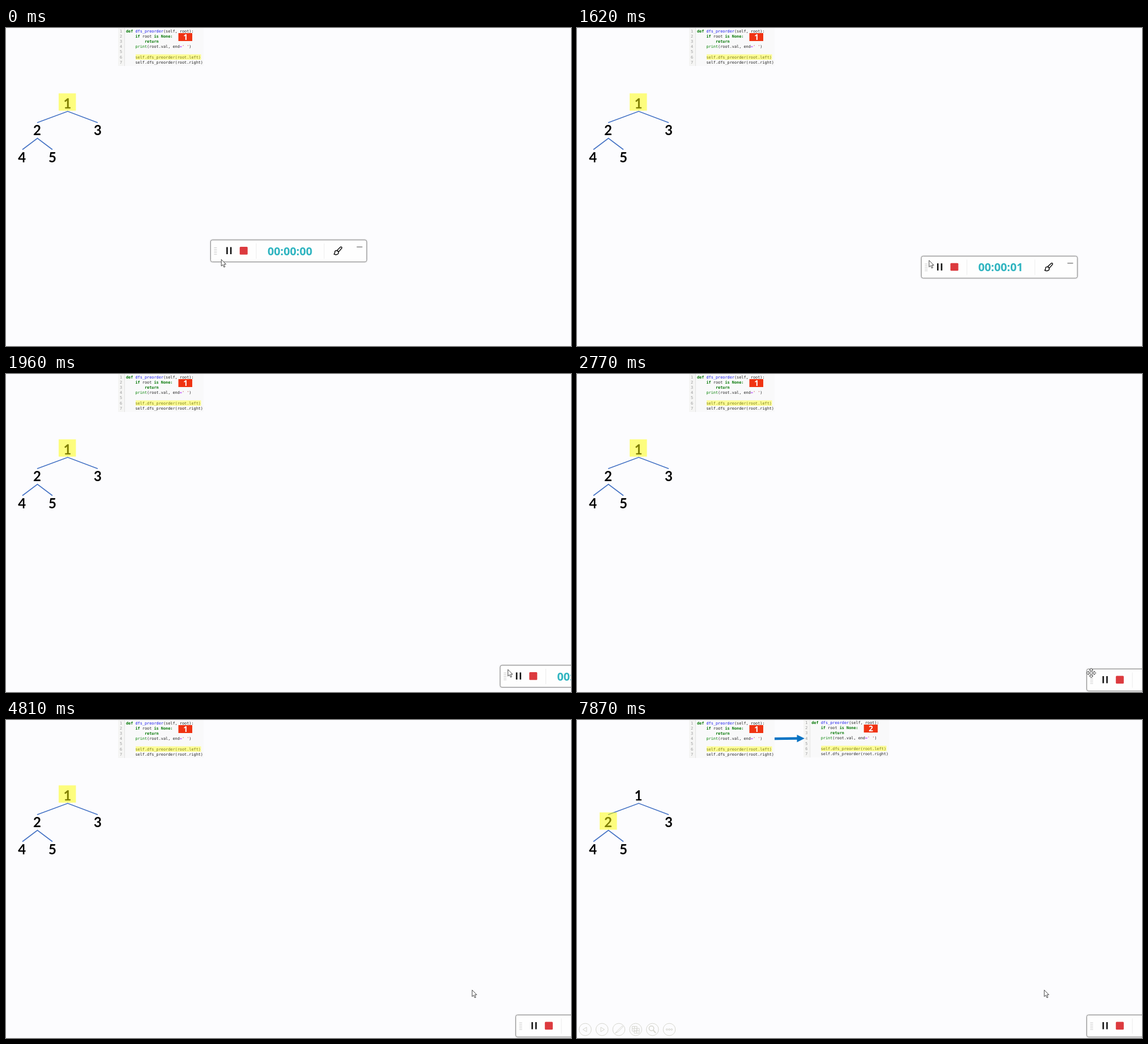
Write an HTML page that moves like this. It is 998 px wide and 561 px high and loops after 8000 ms.

```html
<!DOCTYPE html>
<html lang="en">
<head>
<meta charset="utf-8">
<title>Preorder traversal</title>
<style>
  html, body { margin: 0; width: 100%; height: 100%; overflow: hidden; background: #fcfcfe; }
  svg { display: block; width: 998px; height: 561px; }
  .code { font: 6.85px "DejaVu Sans Mono", monospace; fill: #222; }
  .kw { font-weight: bold; fill: #007500; }
  .fn { fill: #1a1aee; }
  .builtin { fill: #008000; }
  .op { fill: #a2f; }
  .str { fill: #ba2121; }
  .num { fill: #999; }
  .tree { font: bold 24px Lato, sans-serif; text-anchor: middle; }
  .badge { font: bold 13.5px "Open Sans", sans-serif; fill: #fff; text-anchor: middle; }
  .timer { font: bold 19.8px "Open Sans", sans-serif; fill: #2fb4c0; text-anchor: middle; }
  .mark { fill: #ff0; fill-opacity: .5; }
  .nav { fill: none; stroke: #d6d6cf; }
</style>
</head>
<body>
<svg viewBox="0 0 998 561">
  <defs>
    <filter id="shadow" x="-5%" y="-20%" width="110%" height="140%">
      <feDropShadow dx="0" dy="0" stdDeviation="1.3" flood-color="#555" flood-opacity=".5"/>
    </filter>
    <g id="code" class="code">
      <path fill="#f9f9fa" d="M198 0H349V67H198Z"/>
      <path fill="#f5f5f4" d="M198 0H209V67H198Z"/>
      <path stroke="#ddd" stroke-width=".8" d="M209.5 0V67"/>
      <g id="numbers" class="num"></g>
      <text x="212" y="8.2"><tspan class="kw">def</tspan> <tspan class="fn">dfs_preorder</tspan>(self, root):</text>
      <text x="228.5" y="17.3"><tspan class="kw">if</tspan> root <tspan class="kw">is</tspan> <tspan class="kw">None:</tspan></text>
      <text x="245" y="26.3" class="kw">return</text>
      <text x="228.5" y="35.4"><tspan class="builtin">print</tspan>(root.val, end<tspan class="op">=</tspan><tspan class="str">' '</tspan>)</text>
      <text x="228.5" y="53.5">self.dfs_preorder(root.left)</text>
      <text x="228.5" y="62.6">self.dfs_preorder(root.right)</text>
      <path class="mark" style="fill-opacity:.4" d="M229 46.5H344.5V56H229Z"/>
      <path fill="#f03312" d="M304.5 9H329V23H304.5Z"/>
    </g>
  </defs>

  <use href="#code"/>
  <text class="badge" x="317" y="21">1</text>
  <g id="call">
    <use href="#code" x="202.2" y="-.9"/>
    <text class="badge" x="519" y="20.2">2</text>
    <path fill="#0a74c4" d="M349 30.7L388.5 30.3V26L402 32.6L388.5 39.2V34.8L349 35.2Z"/>
  </g>

  <path fill="none" stroke="#4472c4" stroke-width="1.6" d="M55 167L109 147L162 167M29 214.5L55.5 194.5L82 214.5"/>
  <g class="tree">
    <text x="108.5" y="142">1</text>
    <text x="55" y="189.3">2</text>
    <text x="162" y="189.3">3</text>
    <text x="28.3" y="236.8">4</text>
    <text x="82" y="236.8">5</text>
  </g>
  <rect id="mark" class="mark" width="30.5" height="30.5"/>

  <g id="nav" class="nav">
    <g id="rings"></g>
    <path d="M17 542V550L10.5 546ZM42 542V550L48.5 546Z"/>
    <path d="M80 539.5L71 548.5L67.5 552.5L72.5 550L81.5 541Z"/>
    <path d="M97.5 540.5H106V549H97.5ZM101 544H110V552.5H101ZM97.5 544.7H101M101.5 540.5V544M101 548.2H110M105.5 544V552.5"/>
    <circle cx="131.5" cy="544" r="4.2" stroke-width="1.5"/>
    <path stroke-width="2" d="M134.5 547L139 552"/>
    <g id="dots"></g>
  </g>

  <g id="bar">
    <rect width="275.5" height="38.5" rx="3" fill="#fefefe" stroke="#8c8c8c" filter="url(#shadow)"/>
    <path stroke="#ccc" stroke-width="5" stroke-dasharray="1 2" d="M8.5 13V26"/>
    <path stroke="#111" stroke-width="2.6" d="M29 12.5V25M35.7 12.5V25"/>
    <rect x="51.3" y="12" width="14" height="13.7" rx="1.5" fill="#dc3a3e"/>
    <path stroke="#ececec" d="M80.5 6V33M200.5 6V33"/>
    <text id="timer" class="timer" x="140" y="26.6"></text>
    <path fill="#fff" stroke="#111" stroke-width="1.5" stroke-linejoin="round" d="M223.5 18L229.5 12.3Q232.3 11.6 231.7 14.3L226 21ZM223 18.5Q219 18.5 219.3 22Q219.3 24 217.8 24.8Q222.5 27.3 225.5 24Q227 21 223 18.5Z"/>
    <path stroke="#666" stroke-width="1.2" d="M258 12.3H268"/>
  </g>

  <path id="arrow" fill="#fff" stroke="#333" stroke-width=".9" d="M.3 .3V12L3 9.5L5 14L6.9 13.2L5 8.8H8.6Z"/>
  <path id="move" fill="#fff" stroke="#333" stroke-width=".9" d="M0-8.5L3.2-5H1.2V-1.2H5V-3.2L8.5 0L5 3.2V1.2H1.2V5H3.2L0 8.5L-3.2 5H-1.2V1.2H-5V3.2L-8.5 0L-5-3.2V-1.2H-1.2V-5H-3.2Z"/>
</svg>
<script>
const el = id => document.getElementById(id);
const repeat = (n, make) => Array.from({ length: n }, (_, i) => make(i)).join('');
const place = (node, x, y) => node.setAttribute('transform', `translate(${x} ${y})`);
const show = (node, on) => node.setAttribute('visibility', on ? 'visible' : 'hidden');

el('numbers').innerHTML = repeat(7, i => `<text x="201" y="${8.2 + i * 9.07}">${i + 1}</text>`);
el('rings').innerHTML = repeat(6, i => `<circle cx="${14.5 + i * 29.7}" cy="546" r="10.8"/>`);
el('dots').innerHTML = repeat(3, i => `<circle cx="${158.8 + i * 4.2}" cy="546" r="1.4"/>`);

// Tracks hold [time, x, y].
const barTrack = [[1360, 361.5, 374], [1620, 607.5, 402.3], [1960, 873, 514], [2170, 875, 514], [2380, 900.5, 520.5]];
const grip = [13.3, 7];
const pointerTrack = [
  [90, 380, 408], [890, 416, 384], [940, 416, 384], [1190, 374.8, 381],
  ...barTrack.map(([t, x, y]) => [t, x + grip[0], y + grip[1]]),
  [2770, 913, 527.5], [2980, 872.5, 519], [3150, 872.5, 519], [3490, 829, 470.5],
  [4510, 829, 470.5], [4810, 823, 476], [7750, 823, 476], [7870, 825, 476]
];

function at(track, t) {
  const i = track.findIndex(p => p[0] > t);
  if (i === 0) return track[0].slice(1);
  if (i < 0) return track[track.length - 1].slice(1);
  const [a, b] = [track[i - 1], track[i]];
  const k = (t - a[0]) / (b[0] - a[0]);
  return [a[1] + (b[1] - a[1]) * k, a[2] + (b[2] - a[2]) * k];
}

function draw(now) {
  const t = now % 8000;
  const called = t >= 6300;
  const moving = t >= 2770 && t < 2850;
  const [x, y] = at(pointerTrack, t);
  place(el('bar'), ...at(barTrack, t));
  place(el('arrow'), x, y);
  place(el('move'), x - 4.5, y);
  show(el('arrow'), !moving);
  show(el('move'), moving);
  show(el('call'), called);
  place(el('mark'), called ? 40 : 93, called ? 163 : 115.3);
  el('nav').setAttribute('opacity', Math.min(1, Math.max(0, (t - 6260) / 550)));
  el('timer').textContent = '00:00:0' + Math.floor(Math.max(0, t - 500) / 1000);
  requestAnimationFrame(draw);
}
requestAnimationFrame(draw);
</script>
</body>
</html>
```
